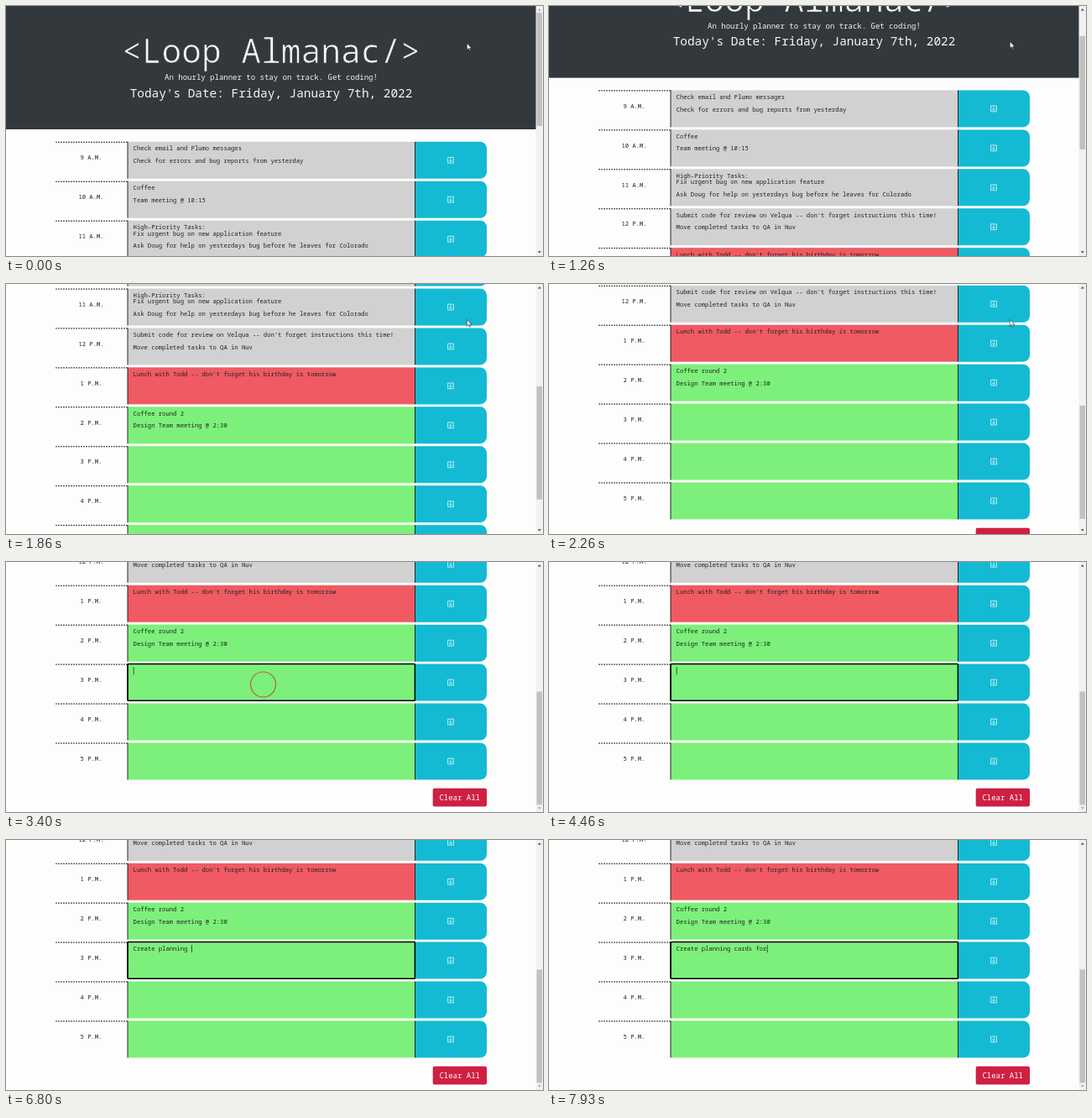
Recreate the animation shown at these times as an HTML page. Size 640 by 298 pixels, loop 8000 ms.

```html
<!DOCTYPE html>
<html lang="en">
<head>
<meta charset="utf-8">
<title>Day planner</title>
<style>
html, body { margin: 0; height: 100%; overflow: hidden; background: #fdfdfd; }
svg { display: block; width: 640px; height: 298px; }
text { font-family: "Noto Sans Mono", monospace; font-size: 7.2px; fill: #222; white-space: pre; }
.head text { fill: #f4f5f5; font-weight: 300; text-anchor: middle; }
.mid { text-anchor: middle; }
</style>
</head>
<body>
<svg viewBox="0 0 640 298">
  <g id="page">
    <g class="head">
      <rect width="632" height="147" fill="#33383c"/>
      <text x="316" y="68" style="font-size:39.6px" stroke="#33383c" stroke-width=".7">&lt;Loop Almanac/&gt;</text>
      <text x="316" y="88" style="font-size:9px">An hourly planner to stay on track. Get coding!</text>
      <text x="316" y="108.5" style="font-size:14.4px">Today's Date: Friday, January 7th, 2022</text>
    </g>
    <g id="rows"></g>
    <g id="focus">
      <rect x="145" width="342.4" height="43.6" rx="1" fill="none" stroke="#000" stroke-width="1.5"/>
      <text id="typed" x="151.6" y="10.7"></text>
      <rect id="caret" y="3.6" width=".7" height="9" fill="#111"/>
    </g>
    <rect x="508.7" y="591.7" width="64.3" height="21.6" rx="2" fill="#cf2044"/>
    <text class="mid" x="540.7" y="606" style="font-size:9px;fill:#fff">Clear All</text>
  </g>
  <circle id="ring" cx="306.5" cy="146" r="15" fill="none" stroke="#b5623a" stroke-width="1.2"/>
  <rect x="631.5" width="8.5" height="298" fill="#f1f1f1"/>
  <rect id="thumb" x="632.5" width="6.5" height="135" fill="#c1c1c1"/>
  <path id="up" d="M633.8 5.5h4l-2-2.4z"/>
  <path id="down" d="M633.8 292.3h4l-2 2.4z"/>
  <path id="cursor" d="M0 0V8L1.9 6.3 3.2 9 4.4 8.5 3.2 5.9H5.6Z" fill="#fff" stroke="#000" stroke-width=".5"/>
</svg>
<script>
const LOOP = 8000, ROW_TOP = 161.8, PITCH = 46.95, MAX_SCROLL = 321.9;
const PAST = '#d1d1d1', NOW = '#ef5a63', FUTURE = '#7cf07a';
const $ = id => document.getElementById(id);
const rowY = i => ROW_TOP + i * PITCH;

const rows = [
  ['9 A.M.', PAST, 'Check email and Plumo messages', '', 'Check for errors and bug reports from yesterday'],
  ['10 A.M.', PAST, 'Coffee', '', 'Team meeting @ 10:15'],
  ['11 A.M.', PAST, 'High-Priority Tasks:', 'Fix urgent bug on new application feature', '',
    'Ask Doug for help on yesterdays bug before he leaves for Colorado'],
  ['12 P.M.', PAST, "Submit code for review on Velqua -- don't forget instructions this time!", '',
    'Move completed tasks to QA in Nuv'],
  ['1 P.M.', NOW, "Lunch with Todd -- don't forget his birthday is tomorrow"],
  ['2 P.M.', FUTURE, 'Coffee round 2', '', 'Design Team meeting @ 2:30'],
  ['3 P.M.', FUTURE], ['4 P.M.', FUTURE], ['5 P.M.', FUTURE]
];

$('rows').innerHTML = rows.map(([hour, color, ...lines], i) => `
  <g transform="translate(0 ${rowY(i)})">
    <path d="M59 .5H145" stroke="#222" stroke-dasharray="2 1"/>
    <text class="mid" x="101.5" y="21.2">${hour}</text>
    <rect x="145" width="342.5" height="44" fill="${color}"/>
    <path d="M145 0V44M487.5 0V44" stroke="#111" stroke-width=".9"/>
    <path d="M488 0H565a8 8 0 0 1 8 8V36a8 8 0 0 1 -8 8H488Z" fill="#14bad3"/>
    <path d="M526.6 18.6h6.8v6.8h-6.8zM530 19.8v4M528.2 22.2l1.8 1.8 1.8-1.8" fill="none" stroke="#e8fafd" stroke-width=".8"/>
    ${lines.map((s, n) => `<text x="151.6" y="${10.7 + n * 7.2}">${s}</text>`).join('')}
  </g>`).join('');
$('focus').setAttribute('transform', `translate(0 ${rowY(6)})`);

// Linear interpolation through [time, value] keys.
function track(keys, t) {
  const i = keys.findIndex(k => k[0] > t);
  if (i === 0) return keys[0][1];
  if (i < 0) return keys[keys.length - 1][1];
  const [t0, a] = keys[i - 1], [t1, b] = keys[i];
  return a + (b - a) * (t - t0) / (t1 - t0);
}

const scrollKeys = [[940, 0], [1000, 4], [1260, 61], [1600, 184.6], [1900, 260], [2100, 290],
  [2250, 300.9], [2380, 300.9], [2480, 316], [2560, MAX_SCROLL]];
const cursorX = [[2560, 549.3], [3150, 306]];
const cursorY = [[60, 44.3], [400, 42.3], [2560, 42.3], [3150, 142]];
const note = 'Create planning cards for';
const CLICK = 3240, TYPE_START = 4690, KEY_TIME = 129;

function draw(now) {
  const t = now % LOOP;
  const scroll = track(scrollKeys, t);
  $('page').setAttribute('transform', `translate(0 ${-scroll})`);
  $('thumb').setAttribute('y', 8 + scroll * .455);
  $('up').setAttribute('fill', scroll > 0 ? '#505050' : '#a3a3a3');
  $('down').setAttribute('fill', scroll < MAX_SCROLL ? '#505050' : '#a3a3a3');

  const x = track(cursorX, t);
  $('cursor').setAttribute('transform', `translate(${x} ${track(cursorY, t)})`);
  $('cursor').style.display = x > 487 ? '' : 'none';

  const count = Math.max(0, Math.min(note.length, Math.floor((t - TYPE_START) / KEY_TIME)));
  const blinkOn = t > TYPE_START || (t - CLICK) % 1000 < 500;
  $('focus').style.display = t > CLICK ? '' : 'none';
  $('typed').textContent = note.slice(0, count);
  $('caret').setAttribute('x', 151.8 + count * 4.32);
  $('caret').style.display = blinkOn ? '' : 'none';
  $('ring').style.display = t > CLICK && t < CLICK + 300 ? '' : 'none';
  requestAnimationFrame(draw);
}
requestAnimationFrame(draw);
</script>
</body>
</html>
```
